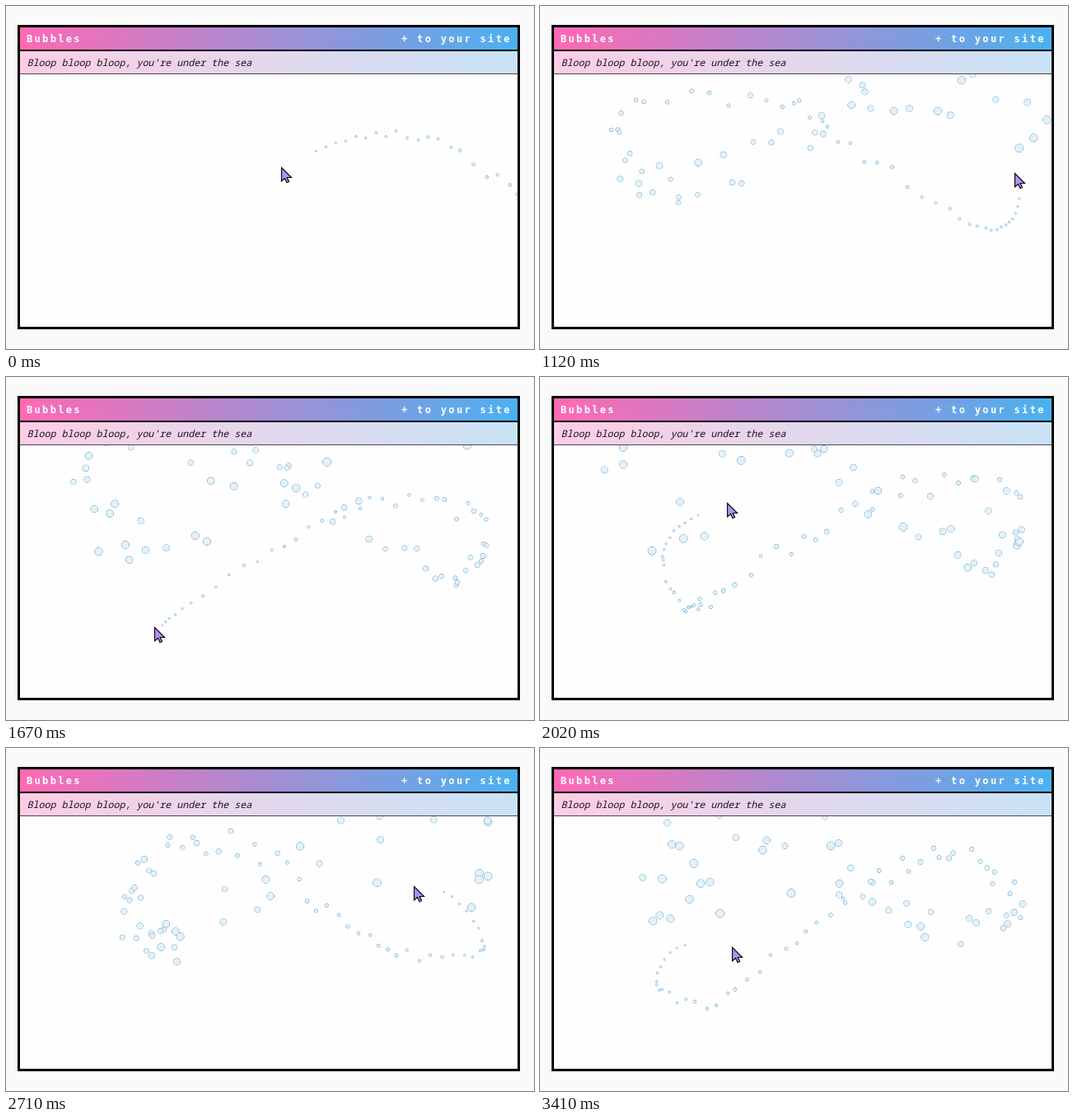
Write an HTML page with a canvas that moves like this. It is 641x417 px and loops after 3480 ms.

```html
<!DOCTYPE html>
<html lang="en">
<head>
<meta charset="utf-8">
<title>Bubbles</title>
<style>
  html, body { margin: 0; width: 100%; height: 100%; overflow: hidden; background: #fafafa; }
  svg, canvas { position: absolute; display: block; }
  svg { left: 0; top: 0; }
  canvas { left: 17px; top: 83px; }
  text { white-space: pre; }
  .bar { font: bold 12px "DejaVu Sans Mono", monospace; letter-spacing: 2.33px; fill: #fff; }
  .note { font: italic 11.67px "Noto Sans Mono", monospace; fill: #1c1020; }
</style>
</head>
<body>
<svg width="641" height="417">
  <defs>
    <linearGradient id="strong"><stop stop-color="#ff69b4"/><stop offset="1" stop-color="#4bb1f1"/></linearGradient>
    <linearGradient id="pale"><stop stop-color="#fdcde4"/><stop offset="1" stop-color="#c8e2f5"/></linearGradient>
  </defs>
  <rect x="14" y="23" width="610" height="370"/>
  <rect x="17" y="26" width="604" height="27" fill="url(#strong)"/>
  <rect x="17" y="55" width="604" height="27" fill="url(#pale)"/>
  <rect x="17" y="82" width="604" height="1" fill="#4c4654"/>
  <rect x="17" y="83" width="604" height="307" fill="#fefefe"/>
  <text class="bar" x="25" y="44">Bubbles</text>
  <text class="bar" x="480" y="44">+ to your site</text>
  <text class="note" x="25.5" y="73">Bloop bloop bloop, you're under the sea</text>
</svg>
<canvas id="sea" width="604" height="307"></canvas>
<script>
const ctx = document.getElementById('sea').getContext('2d');
const LOOP = 3480, STEP = 69.6, FRAMES = 50;
const TICKS = 4;      // physics ticks per frame, one bubble per tick
const FIRST = -20;    // tick of the first key point
const SPACING = 8;    // ticks between key points
const LEAD = 3.4;     // ticks the pointer runs ahead of its bubbles

// key points of the pointer's sweep, joined by a smooth curve
const path = [
  [630, 255], [525, 176], [425, 164], [326, 198], [209, 260], [117, 248], [103, 168],
  [277, 135], [377, 188], [510, 268], [570, 268], [572, 197], [457, 169], [339, 211],
  [214, 285], [178, 300], [149, 222], [192, 168], [285, 145], [394, 218], [488, 264],
  [580, 254], [532, 175], [437, 174], [340, 225], [227, 319], [144, 300], [176, 240], [310, 250]
];

// Catmull-Rom position on the path
function pathAt(tick) {
  const p = (tick - FIRST) / SPACING, i = Math.floor(p), u = p - i;
  const [a, b, c, d] = [-1, 0, 1, 2].map(o => path[Math.max(0, Math.min(path.length - 1, i + o))]);
  return [0, 1].map(n => b[n] + u / 2 * (c[n] - a[n]
    + u * (2 * a[n] - 5 * b[n] + 4 * c[n] - d[n] + u * (3 * (b[n] - c[n]) + d[n] - a[n]))));
}

function seeded(seed) {
  let s = Math.imul(seed + 101, 0x9E3779B1);
  return () => {
    s = s + 0x6D2B79F5 | 0;
    let r = Math.imul(s ^ s >>> 15, 1 | s);
    r ^= r + Math.imul(r ^ r >>> 7, 61 | r);
    return ((r ^ r >>> 14) >>> 0) / 4294967296;
  };
}

function drawBubble(birth, age) {
  const rand = seeded(birth), sign = () => rand() < 0.5 ? -1 : 1;
  const life = Math.floor(60 + 60 * rand());
  if (age >= life) return;
  let [x, y] = pathAt(birth);
  let vx = sign() * rand() / 10, vy = -0.4 - rand();
  for (let i = 0; i < age; i++) {
    x += vx;
    y += vy;
    vx += sign() * 2 / 75;
    vy -= rand() / 600;
  }
  const scale = 0.2 + (age + 2) / life;
  ctx.beginPath();
  ctx.arc(x + 0.4 - 2 * scale, y, 4 * scale, 0, 2 * Math.PI);
  ctx.stroke();
  ctx.fill();
}

const arrow = new Path2D('M.5 .5V17L4.5 13.5 7 18.7 9.5 17.5 7.2 12.5H12.5Z');

function drawPointer(tick) {
  const [x, y] = pathAt(tick);
  ctx.save();
  ctx.translate(Math.round(x), Math.round(y + 2));
  ctx.fillStyle = '#b392ea';
  ctx.strokeStyle = '#0c0818';
  ctx.lineWidth = 1.2;
  ctx.fill(arrow);
  ctx.stroke(arrow);
  ctx.restore();
}

function draw() {
  const t = performance.now() % LOOP;
  const now = TICKS * Math.min(FRAMES - 1, Math.floor((t + 6) / STEP));
  ctx.setTransform(1, 0, 0, 1, 0, 0);
  ctx.clearRect(0, 0, 604, 307);
  ctx.translate(-17, -83);
  ctx.fillStyle = '#e6f1f7';
  ctx.strokeStyle = '#3a92c5';
  ctx.lineWidth = 1;
  for (let b = Math.max(FIRST + 1, now - 120); b <= now; b++) drawBubble(b, now - b);
  drawPointer(now + LEAD);
  requestAnimationFrame(draw);
}
draw();
</script>
</body>
</html>
```
